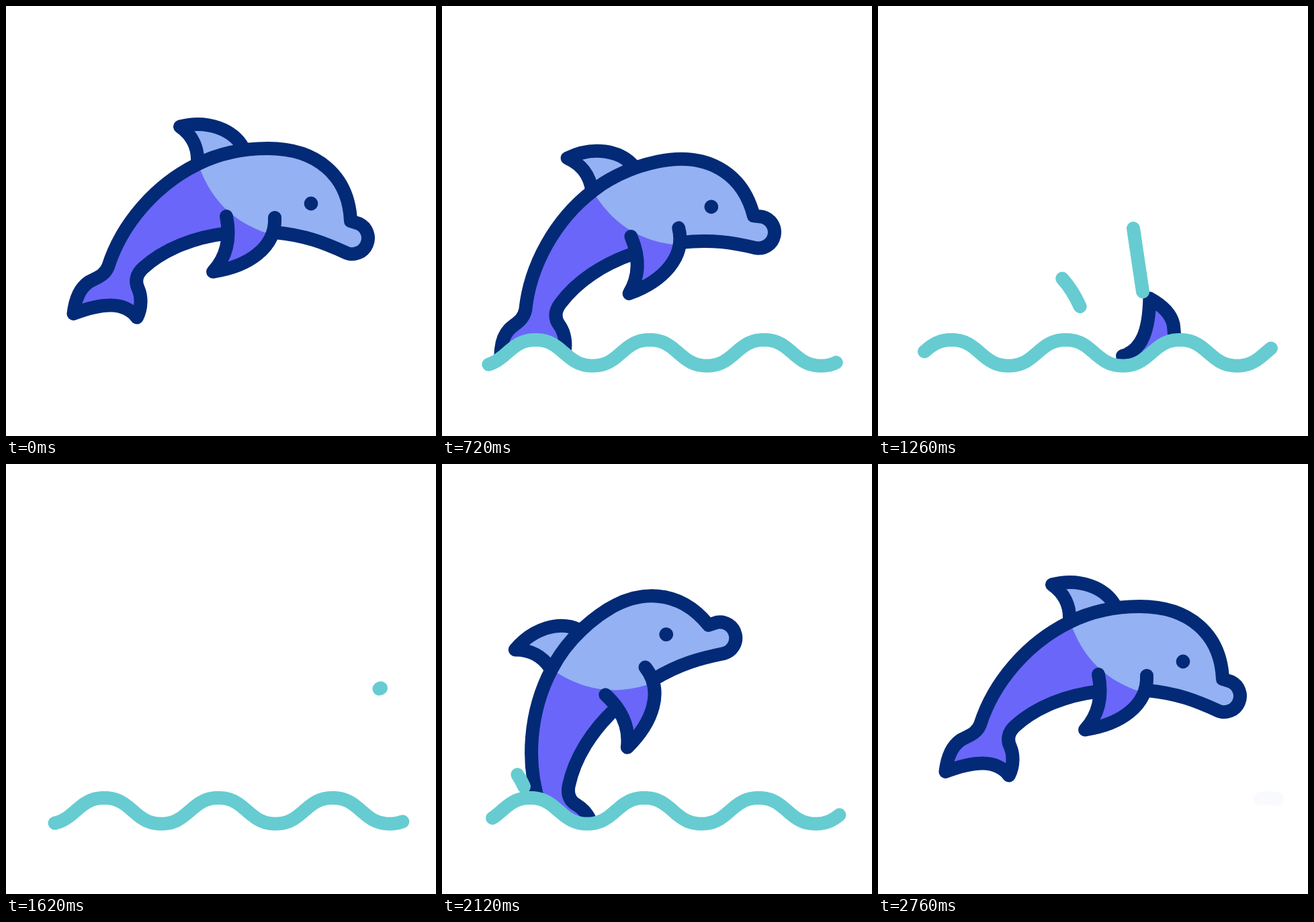
An HTML page that plays this animation: 640 by 640 pixels, repeating every 3 s.

```html
<!DOCTYPE html>
<html lang="en">
<head>
<meta charset="utf-8">
<title>Leaping dolphin</title>
<style>
  html, body { margin: 0; width: 100%; height: 100%; overflow: hidden; background: #fff; }
  svg { display: block; width: 100%; height: 100%; }
  .line { fill: none; stroke: #032a76; stroke-width: 20; }
  .water { fill: none; stroke: #66ccd1; stroke-width: 20; }
  .line, .water { stroke-linecap: round; stroke-linejoin: round; }
  .light { fill: #93b1f3; }
  .deep { fill: #6a66f9; }
</style>
</head>
<body>
<svg viewBox="0 0 640 640">
  <defs><clipPath id="air"><path id="airShape"/></clipPath></defs>
  <g clip-path="url(#air)"><g id="dolphin">
    <path class="light" id="dorsalFill"/>
    <path class="line" id="dorsalLine"/>
    <path class="deep" id="finFill"/>
    <path class="deep" id="bodyFill"/>
    <path class="light" id="headFill"/>
    <path class="line" id="bodyLine"/>
    <path class="line" id="finLine"/>
    <circle cx="454" cy="294" r="10.4" fill="#032a76"/>
  </g></g>
  <path class="water" id="wave"/>
  <g id="splashes"></g>
</svg>
<script>
const el = id => document.getElementById(id);
const draw = (id, d) => el(id).setAttribute('d', d);
const smooth = u => { u = Math.min(1, Math.max(0, u)); return u * u * (3 - 2 * u); };

// Dolphin outline in its resting pose
const head = 'C318 219 354 212 390 212 C462 212 510 252 513 320 L525.5 324 ' +
  'A23.75 23.75 0 0 1 506.5 367.5 C475 353 445 341 400 337';
const tail = 'M328 338.5 C280 344 235 362 204 390 C193 400 192 411 197 421 ' +
  'C202 433 202 449 195 463.5 C176 439 143 442 100.5 458 ' +
  'C103 436 110 420 123 411 C135 404 146 402 152 388 C172 325 222 266 286 235 ';
const dorsal = 'M285 232 C286 212 278 193 259 179.5 C300 169 338 184 353 211';
const fin = 'M328 313 C334 343 330 372 308 395.5 C360 388 402 360 400 315';

draw('dorsalFill', dorsal + ' L353 225 Z');
draw('dorsalLine', dorsal);
draw('finFill', fin + ' Z');
draw('finLine', fin);
draw('bodyFill', tail + head + ' Z');
draw('bodyLine', tail + head);
draw('headFill', 'M286 235 ' + head + ' L388 338 C335 320 303 285 286 235 Z');

// Each splash: start time and path
const TRAVEL = 260, LAG = 90;
const splashes = [
  [1100, 'M307 464 C298 436 280 404 249 384'],
  [1100, 'M399.1 459.5 L370.6 267.6'],
  [1290, 'M478 470 C486 405 512 350 558 333.5'],
  [2051, 'M122 480 C110 452 85 425 33 412']
].map(([start, d]) => {
  const path = document.createElementNS('http://www.w3.org/2000/svg', 'path');
  path.setAttribute('class', 'water');
  path.setAttribute('d', d);
  path.setAttribute('pathLength', 1);
  el('splashes').append(path);
  return { start, path };
});

function drawSplash({ start, path }, t) {
  const front = smooth((t - start) / TRAVEL);
  const back = smooth((t - start - LAG) / TRAVEL);
  path.style.display = front > 0 && back < 1 ? '' : 'none';
  path.setAttribute('stroke-dasharray', `${Math.max(0.001, front - back)} 3`);
  path.setAttribute('stroke-dashoffset', -back);
}

const PERIOD = 170;
const crestAt = t => 58 - 0.37 * (t - 480);

function wavePath(t, from, to) {
  const crest = crestAt(t), pts = [];
  const add = x => {
    const a = (x - crest) / PERIOD * 2 * Math.PI;
    const y = 516.2 - 20.3 * Math.cos(a) + 1.01 * Math.cos(3 * a);
    pts.push(x.toFixed(2) + ' ' + y.toFixed(2));
  };
  for (let x = from; x < to; x += 3) add(x);
  add(to);
  return 'M' + pts.join('L');
}

// Ends of the wave drift and wobble as crests pass
function waveEnd(base, t) {
  const x = base + 0.004 * t;
  return x + 2.4 * Math.sin(4 * Math.PI * (x - crestAt(t)) / PERIOD);
}

const LOOP = 3000, STEP = 20, REST = 2760;

// At rest only a pale trace of the last wave piece remains
function drawWave(time) {
  const t = Math.min(time, REST - STEP);
  const left = waveEnd(64.5, t), span = waveEnd(581.5, t) - left;
  const shown = smooth((t - 80) / 640), gone = smooth((t - 2306) / 500);
  const wave = el('wave');
  wave.style.display = shown > 0 ? '' : 'none';
  wave.style.stroke = time >= REST ? '#f9fafe' : '';
  draw('wave', wavePath(t, left + span * gone, left + span * shown));
  draw('airShape', wavePath(t, -200, 840) + 'L840 -200L-200 -200Z');
}

// Swing back, dive, then rise from the left
function pose(t) {
  if (t < 560) return [-13.6 * smooth(t / 560), 0, 0];
  if (t < 1400) {
    const k = (t - 560) / 380, u = (t - 560) / 700;
    return [-13.6 + 22 * k ** 2.85, -23 * Math.sin(Math.PI * u) - 3 * u, 82 * k ** 1.22];
  }
  const k = Math.max(0, (2572 - t) / 452);
  return [-36.2 * k ** 2.85, 6 * k ** 4, 6 * k ** 5];
}

function drawDolphin(t) {
  const [angle, x, y] = pose(t), dolphin = el('dolphin');
  dolphin.style.display = t >= 1400 && t < 1780 ? 'none' : '';
  dolphin.setAttribute('transform', `translate(${x} ${y}) rotate(${angle} 320 464)`);
}

const began = performance.now();

function render() {
  const now = Math.max(0, performance.now() - began) % LOOP;
  const t = Math.min(REST, Math.floor(now / STEP) * STEP);
  drawDolphin(t);
  drawWave(t);
  splashes.forEach(s => drawSplash(s, t));
  requestAnimationFrame(render);
}
render();
</script>
</body>
</html>
```
